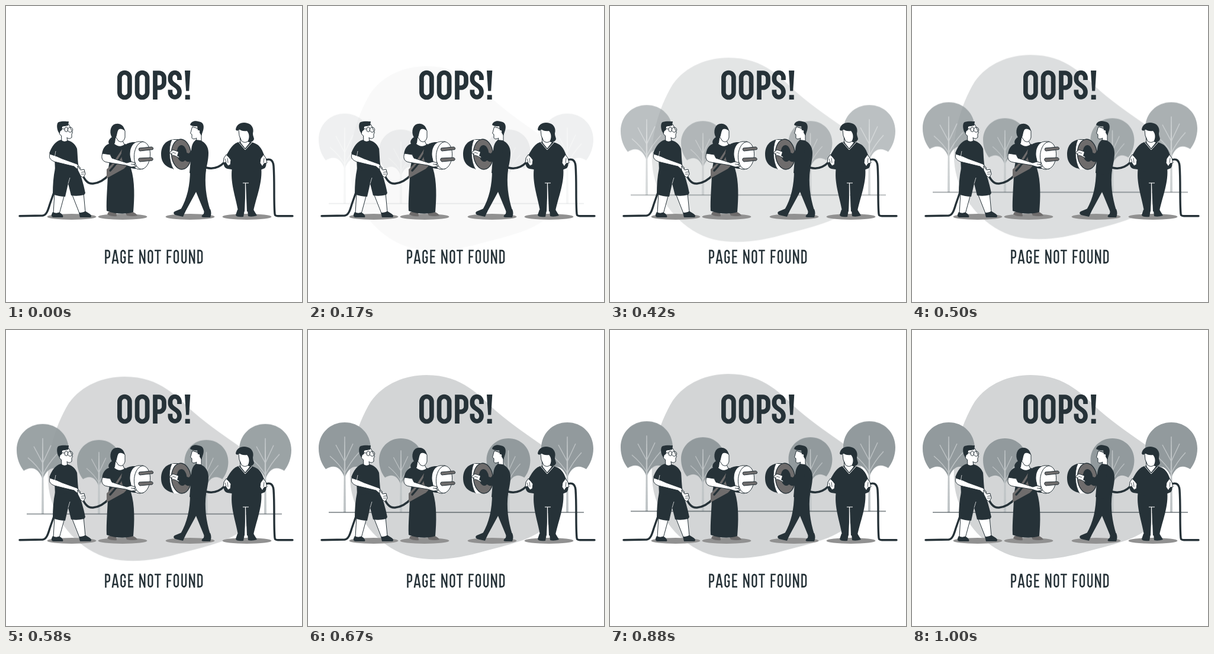
Write an HTML page with a canvas that moves like this. It is 500 px wide and 500 px high and loops after 1040 ms.

```html
<!DOCTYPE html>
<html lang="en">
<head>
<meta charset="utf-8">
<title>Page not found</title>
<style>
html, body { margin: 0; width: 100%; height: 100%; overflow: hidden; background: #fff; }
canvas { display: block; width: 500px; height: 500px; }
</style>
</head>
<body>
<canvas id="stage" width="500" height="500" role="img" aria-label="OOPS! PAGE NOT FOUND">OOPS! PAGE NOT FOUND</canvas>
<script>
const DARK = '#263238', GREY = '#6e6c6c', SHADE = '#919191', WHITE = '#fff';
const LOOP = 1040, FPS = 24, RISE = 30;
const stage = document.getElementById('stage').getContext('2d');
let g = stage;

function fill(d, color = DARK) {
  g.fillStyle = color;
  g.fill(new Path2D(d));
}

function line(d, width = 1, color = DARK) {
  g.strokeStyle = color;
  g.lineWidth = width;
  g.stroke(new Path2D(d));
}

function outlined(d, color = WHITE, width = 1) {
  fill(d, color);
  line(d, width);
}

function oval(x, y, rx, ry, color, tilt = 0) {
  g.beginPath();
  g.ellipse(x, y, rx, ry, tilt, 0, Math.PI * 2);
  g.fillStyle = color;
  g.fill();
}

function ring(x, y, rx, ry, tilt = 0, width = 1) {
  g.beginPath();
  g.ellipse(x, y, rx, ry, tilt, 0, Math.PI * 2);
  g.strokeStyle = DARK;
  g.lineWidth = width;
  g.stroke();
}

function cable(d) {
  g.lineCap = 'round';
  line(d, 3.4);
  g.lineCap = 'butt';
}

function layer(...parts) {
  const c = document.createElement('canvas');
  c.width = c.height = 500;
  g = c.getContext('2d');
  g.lineJoin = 'round';
  parts.forEach(part => part());
  return c;
}

// Scenery

function blob() {
  fill('M200 76C262 76 290 112 318 137C345 160 372 178 400 198C434 222 432 275 415 315C400 350 345 361 300 373C255 386 215 392 175 383C125 370 85 325 74 275C63 222 82 160 106 121C128 90 165 76 200 76Z', '#d3d5d6');
}

function tree(x, top, k) {
  g.save();
  g.translate(x, top);
  g.scale(k, k);
  fill('M0 0C-25 0-44 19-44 44C-44 58-39 70-32 79C-20 71-7 73 0 94C7 73 20 71 32 79C39 70 44 58 44 44C44 19 25 0 0 0Z', '#929a9d');
  const bark = '#bfc4c6';
  line('M0 66L-15 38M0 66L14 36M0 86Q-9 70-25 57M0 86Q9 67 24 51', 1.4, bark);
  g.restore();
  fill(`M${x - .7} ${top + 24 * k}L${x - 2} 308H${x + 2}L${x + .7} ${top + 24 * k}Z`, bark);
}

function trees() {
  tree(62, 156, 1);
  tree(157, 183, .84);
  tree(338.5, 183, .84);
  tree(438, 156, 1);
}

function ground() {
  line('M35 308H466');
}

// Lettering: stroked glyphs on a cell 23 high, with their advance

const glyphs = {
  P: [12.3, 'M3.2 23V1.5H6.2a3.2 3.2 0 0 1 3.2 3.2V10a3.2 3.2 0 0 1-3.2 3.2H3.2'],
  A: [13.1, 'M2 23L5.9 1.3H7.2L11.1 23M3.4 17.8H9.7'],
  G: [12.8, 'M9.6 7.5V5.2a3.2 3.7 0 0 0-6.4 0v12.6a3.2 3.7 0 0 0 6.4 0V12.3H6.6'],
  E: [11.6, 'M10.4 1.4H3.2V21.6H10.4M3.2 11.3H9.4'],
  N: [13.6, 'M3 23V0M3 1L10.6 22M10.6 23V0'],
  O: [12.9, 'M3.2 5.2a3.25 3.7 0 0 1 6.5 0v12.6a3.25 3.7 0 0 1-6.5 0z'],
  T: [11.5, 'M.5 1.4H11M5.75 1V23'],
  F: [11.2, 'M10.2 1.4H3.2V23M3.2 11.7H9'],
  U: [12.8, 'M3.2 0V17.8a3.2 3.7 0 0 0 6.4 0V0'],
  D: [12.9, 'M3.2 1.5V21.5H6a3.6 3.6 0 0 0 3.6-3.6V5.1a3.6 3.6 0 0 0-3.6-3.6z'],
  ' ': [7, '']
};

function lettering() {
  g.save();
  g.lineJoin = 'miter';
  for (const x of [191.9, 221.6])
    line(`M${x} 121a8.5 8.5 0 0 1 17 0v25a8.5 8.5 0 0 1-17 0z`, 7.7);
  line('M252 158V113H258.5a8.5 8.5 0 0 1 8.5 8.5v8a8.5 8.5 0 0 1-8.5 8.5H252', 7.7);
  line('M293 125V121a7.8 8.5 0 0 0-15.6 0V123.5C277.4 134 293 133 293 145.5a7.8 8.5 0 0 1-15.6 0V141.5', 7.7);
  fill('M302 109H311.3L309.2 143.5H304.2ZM302.7 150.2H310.7V158H302.7Z');
  g.translate(165.2, 411.6);
  g.scale(1.024, 1.024);
  for (const ch of 'PAGE NOT FOUND') {
    const [advance, d] = glyphs[ch];
    line(d, 2.5);
    g.translate(advance, 0);
  }
  g.restore();
}

// People

function shadows() {
  for (const x of [111, 197, 311, 407]) oval(x, 356, 41.5, 5, SHADE);
}

function capMan() {
  cable('M23 354.7L62 354C70 353 72 340 75 332L82 312');
  outlined('M82 316L80 350L90 351L99 318Z');
  outlined('M111 317L124 350L134 348L131 316Z');
  fill('M79 348C76 353 76 356 80 357H96C98 354 93 350 90 348.5Q84 351 79 348Z');
  fill('M123 349L125 357H143C147 353 139 350 134 346.5Q130 350 123 349Z');
  fill('M83 274L121 271C126 285 131 300 134 316L132 319Q120 322 110 320L105 300L100 322Q90 322 79 318C79 302 80 288 83 274Z');
  line('M105 300L108 290', .7, WHITE);
  outlined('M93 204L106 200C109 205 110 209 112.5 214L111 216L111 222C108 225 104 224 103 222L104 230H94L93.5 219C89 217 89 211 93 210Z');
  fill('M88 212C85 204 86 197 89 196C95 194 102 195 106 195L105 202C101 203 98 203 95 203L94.5 210Q91 209 91 216Z');
  ring(108.5, 209, 4.2, 4.2);
  ring(101.8, 208.5, 2.8, 4);
  line('M92 207L99 208', .9);
  fill('M93 226C84 228 77 237 73 249L82 255L83 279L123 273C121 263 121 250 120 241C116 231 109 228 104 227Q98 231 93 226Z');
  outlined('M74 250C72 257 75 260 82 263L115 271L122 277L126 274L120 267L95 258L86 254Z');
  line('M84 245L82 256', .7, WHITE);
}

function handCable() {
  cable('M127 281C132 292 137 301 147 300C169 298 183 276 196 252');
  outlined('M121 270L126 277L132 276L134 284L130 290L126 287L121 277Z');
  line('M127 281L133 280M127 284L132 284', .8);
}

function woman() {
  fill('M173 348L171 352Q178 356 187 355L186 348Z', GREY);
  fill('M201 348L204 354Q214 356 222 354Q220 350 212 347Z', GREY);
  outlined('M184 221L182 236Q191 246 201 236L196 226Z');
  fill('M182 232C172 231 164 236 162 250L177 251L172 279C172 300 169 327 170 346C185 352 204 352 215 348C217 325 218 296 211 274L207 250C213 245 209 235 201 233Q192 241 182 232Z');
  outlined('M186 210C191 206 198 205 201 211L201 222C199 229 195 231 190 228L185 221Z');
  fill('M182 220C176 222 171 228 174 233C177 238 182 236 184 231L185 224Z');
  fill('M183 226C175 221 174 207 181 201C188 196 199 199 201 211C197 208 193 206 190 209C187 213 188 222 183 226Z');
}

function plug() {
  fill('M196 242L180 266L170 276V291L199 275L207 267Z', GREY);
  cable('M176 278C184 270 189 263 197 249');
  fill('M219 230C202 229 194 239 195 252C196 266 203 274 219 275Z');
  outlined('M224 229C211 230 207 246 210 257C212 269 218 276 226 276L232 275V229Z');
  oval(230, 252.5, 13.5, 23, WHITE, .08);
  ring(230, 252.5, 13.5, 23, .08);
  outlined('M225 240L246 238Q250 239 248 242.5L226 245Q223 243 225 240Z', GREY);
  outlined('M225 257L246 256Q250 258 247 261L226 263Q222 260 225 257Z', GREY);
  outlined('M163 249C160 257 163 263 171 264L202 269L212 272L220 271L216 268L219 265L211 263L204 265L179 257L176 251Z');
  line('M211 267L218 268', .8);
}

function socket() {
  fill('M290 225C271 224 262 235 262 250C262 265 270 275 291 276Z');
  fill('M280 226C274 239 275 263 283 276L294 276V226Z', WHITE);
  line('M280 226C274 239 275 263 283 276', .8);
  oval(296, 250.5, 16.5, 25.5, GREY, -.08);
  ring(296, 250.5, 16.5, 25.5, -.08, 1.4);
  oval(297, 249, 8.5, 14, DARK, -.08);
}

function walker() {
  cable('M338 273C349 276 359 274 369 264');
  fill('M297 342L285 347C281 350 284 353 290 354L299 356L303 347Z');
  fill('M335 345L334 351C330 354 329 357 334 357H345C347 352 347 348 345 343Z');
  fill('M311 277L338 276C335 300 338 322 345 345Q340 349 335 348L321 314L302 349L295 344C306 325 311 303 311 277Z');
  outlined('M315 204C313 208 313 212 311.5 215L314 217L314 223C316 226 320 224 322 223L320 231H330L330 209Z');
  fill('M311 201C312 195 319 193 325 195C334 196 335 203 333 210L330 219L327 214Q328 209 324 210L323 203Q316 204 311 201Z');
  fill('M321 226C314 231 313 239 313 247L310 282Q325 287 337 281C339 270 342 260 342 248C342 238 337 231 329 227Z');
  outlined('M291 246L282 243L278 246L276 249L281 250L279 252L285 253L293 257Z');
  line('M281 247L287 249', .8);
  fill('M325 234C319 234 314 243 309 249L292 244L289 253L306 263C315 265 323 257 329 247Z');
}

function holder() {
  fill('M391 344L388 353Q389 357 401 356L403 345Z');
  fill('M408 345L409 355Q415 357 424 354L418 344Z');
  fill('M382 272H431C434 297 423 322 418 346Q413 349 407 347L405 302L403 347Q396 349 392 346C388 322 378 298 382 272Z');
  line('M400 299H410M404.5 299V344', 1.2, WHITE);
  fill('M396 229C383 231 378 242 370 256C366 265 367 273 374 275L381 276Q405 286 432 276L437 274C441 270 440 262 437 255C433 242 428 232 413 230Z');
  outlined('M395 218L396 231L404 241L412 231L410 219Z');
  outlined('M393 209Q402 204 412 211L412 224C409 231 402 232 398 228L394 219Z');
  fill('M388 209C389 199 399 195 408 198C416 200 419 208 417 215C417 220 419 222 419 225C417 230 412 231 408 229C412 223 411 215 407 211C400 212 396 210 394 208Q391 213 388 209Z');
  line('M393 230L404 243L415 231', 1, WHITE);
  cable('M436 261C445 257 451 259 452 270C454 298 452 329 454 351Q454 355 460 354.7L484 354.7');
  outlined('M372 251L368 257L367 265L371 264L375 270L379 268L380 260L376 255Z');
  outlined('M435 251L430 258L429 265L433 271L436 266L441 265L439 257Z');
  line('M370 258L372 264M374 257L375 265M436 257L435 265', .8);
}

const blobLayer = layer(blob);
const treeLayer = layer(trees);
const groundLayer = layer(ground);
const front = layer(shadows, capMan, woman, handCable, plug, socket, walker, holder, lettering);

// Timing curve with overshoot

const cubic = (u, a, b) => 3 * (1 - u) ** 2 * u * a + 3 * (1 - u) * u * u * b + u ** 3;

function ease(x) {
  let lo = 0, hi = 1;
  for (let n = 0; n < 24; n++) {
    const mid = (lo + hi) / 2;
    if (cubic(mid, .36, .5) < x) lo = mid; else hi = mid;
  }
  return cubic(lo, -.01, 1.38);
}

function render(now) {
  const step = Math.min(24, Math.floor(((now % LOOP) + 3.5) * FPS / 1000));
  const p = step < 2 ? 0 : ease((step + 1) / 25);
  stage.globalAlpha = 1;
  stage.fillStyle = WHITE;
  stage.fillRect(0, 0, 500, 500);
  stage.globalAlpha = Math.max(0, Math.min(1, p));
  for (const part of [blobLayer, treeLayer, groundLayer])
    stage.drawImage(part, 0, RISE * (1 - p));
  stage.globalAlpha = 1;
  stage.drawImage(front, 0, 0);
}

const start = performance.now();
function tick() {
  render(performance.now() - start);
  requestAnimationFrame(tick);
}
tick();
</script>
</body>
</html>
```
